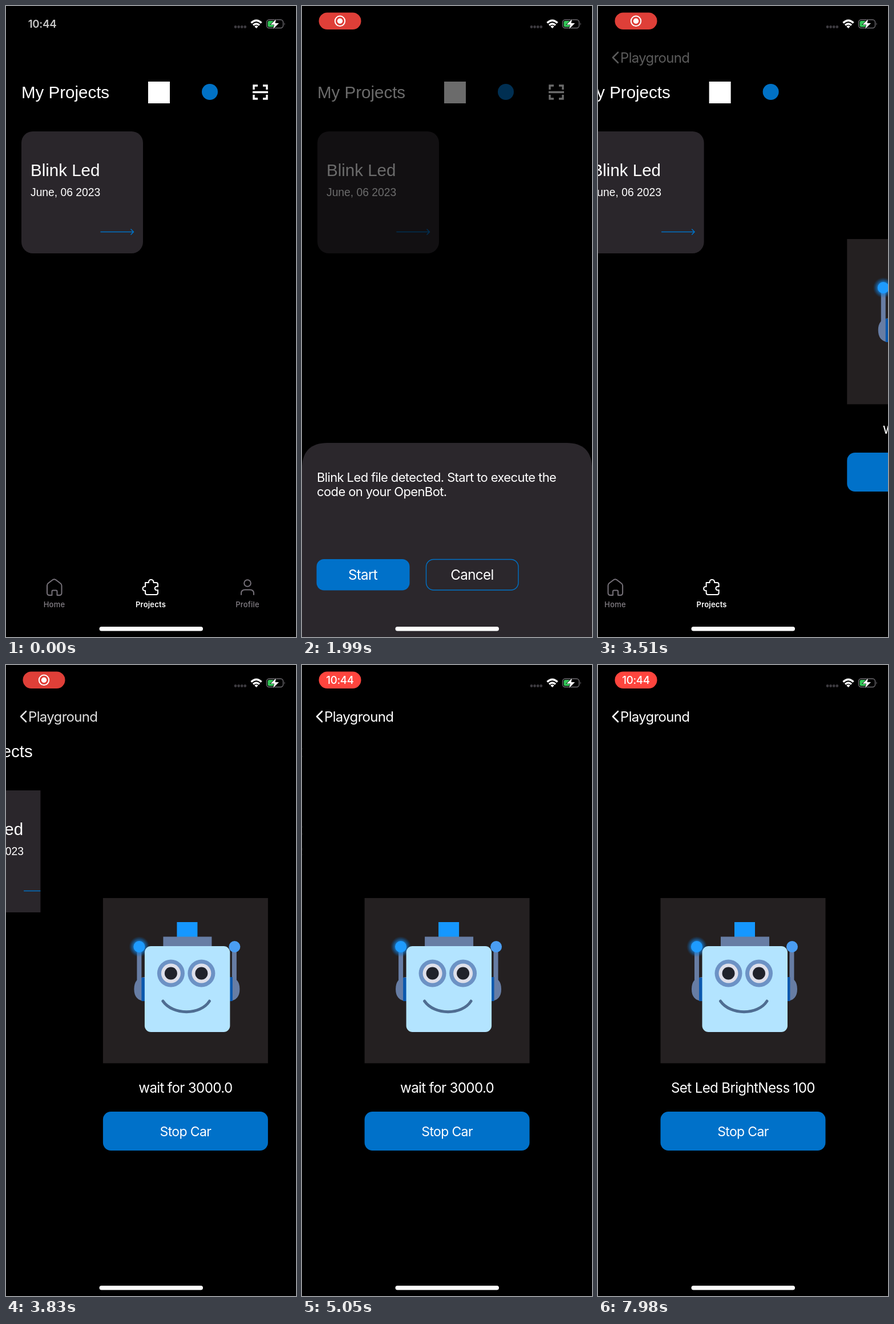
An HTML page that plays this animation: 508x1102 px, repeating every 8 s.

```html
<!DOCTYPE html>
<html lang="en">
<head>
<meta charset="utf-8">
<title>Blink Led</title>
<style>
  html, body { margin: 0; width: 100%; height: 100%; overflow: hidden; background: #000; }
  svg { display: block; width: 100vw; height: 100vh; }
  text { font-family: Inter, "Noto Sans", sans-serif; fill: #fff; letter-spacing: -.028em; }
  .title { font: 29.5px "Liberation Sans", Arial, sans-serif; letter-spacing: 0; }
  .date { font: 19.3px "Liberation Sans", Arial, sans-serif; letter-spacing: 0; }
  .nav { font-size: 24px; }
  .button { font-size: 24.2px; text-anchor: middle; }
  .body { font-size: 22px; }
  .tab { font-size: 13px; font-weight: 500; letter-spacing: .2px; text-anchor: middle; fill: #858087; }
  .tab.on { font-weight: 600; fill: #fff; }
  .clock { font-size: 18.7px; font-weight: 600; letter-spacing: -.3px; text-anchor: middle; }
  .line { fill: none; stroke: #fff; stroke-width: 2; stroke-linecap: round; stroke-linejoin: round; }
  .muted { stroke: #77727a; }
  .blue { stroke: #0071c5; }
</style>
</head>
<body>
<svg viewBox="0 0 508 1102">
  <defs>
    <radialGradient id="glow">
      <stop offset=".5" stop-color="#1688e8" stop-opacity=".8"/>
      <stop offset="1" stop-color="#0b64b4" stop-opacity="0"/>
    </radialGradient>
    <g id="eye">
      <circle r="24" fill="#6c92c5"/>
      <circle r="17" fill="#dedfea"/>
      <circle r="11" fill="#20222b"/>
    </g>
  </defs>
  <rect width="508" height="1102"/>

  <g id="projects">
    <text class="title" x="27" y="161">My Projects</text>
    <rect x="249" y="132" width="38" height="38" fill="#fff"/>
    <circle cx="357" cy="150" r="14" fill="#0071c5"/>
    <path class="line" style="stroke-width:3.4;stroke-linecap:butt;stroke-linejoin:miter"
      d="M434 146V139H441M450 139H457V146M457 155V162H450M441 162H434V155M432 150.5H459"/>
    <rect x="27" y="219" width="213" height="213" rx="20" fill="#2a262b"/>
    <text class="title" x="43" y="297">Blink Led</text>
    <text class="date" x="43" y="332">June, 06 2023</text>
    <path class="line blue" style="stroke-width:1.6" d="M166 394.500H223M219 390L223.500 394.500L219 399"/>
    <path class="line muted" d="M72 1012Q72 1009.500 74 1008L82 1002Q84.500 1000.500 87 1002L95 1008Q97.500 1009.500 97.500 1012V1025Q97.500 1029 93.500 1029H89.500V1022.500Q89.500 1020.500 87.500 1020.500H82.500Q80.500 1020.500 80.500 1022.500V1029H76Q72 1029 72 1025Z"/>
    <path class="line" d="M244 1007H250C249 1000 259 1000 258.500 1007H263Q266 1007 266 1010V1014C259 1012 259 1022 266 1020V1025Q266 1028 263 1028H247Q244 1028 244 1025V1021C238 1022 238 1013 244 1014Z"/>
    <circle class="line muted" cx="423" cy="1008" r="5.800"/>
    <path class="line muted" d="M412 1028V1026Q412 1019.500 418.500 1019.500H427.500Q434 1019.500 434 1026V1028"/>
    <text class="tab" x="84.500" y="1050">Home</text>
    <text class="tab on" x="253.500" y="1050">Projects</text>
    <text class="tab" x="423" y="1050">Profile</text>
  </g>

  <rect id="dim" width="508" height="1102"/>
  <g id="sheet">
    <path d="M0 1102V808Q0 763 45 763H463Q508 763 508 808V1102Z" fill="#2b272c"/>
    <text class="body" x="26" y="831">Blink Led file detected. Start to execute the</text>
    <text class="body" x="26" y="856">code on your OpenBot.</text>
    <rect x="25.500" y="966" width="163" height="54.500" rx="13" fill="#0071c9"/>
    <rect class="line blue" style="stroke-width:1.4" x="217.500" y="966.500" width="161.500" height="53.500" rx="13"/>
    <text class="button" x="106.500" y="1002">Start</text>
    <text class="button" x="298" y="1002">Cancel</text>
  </g>

  <g id="runner">
    <rect width="508" height="1102"/>
    <rect x="109.500" y="407" width="289" height="288.500" fill="#242021"/>
    <rect x="239" y="449" width="36" height="27" fill="#1597ff"/>
    <rect x="215" y="474.500" width="85" height="20" fill="#677da4"/>
    <path d="M173 498V552M339.500 498V552" stroke="#677da4" stroke-width="8"/>
    <path d="M183 545Q164 546 164 566T183 587ZM330 545Q349 546 349 566T330 587Z" fill="#677da4"/>
    <path d="M177 546H184V587H177ZM329 545H336.500V587H329Z" fill="#0b58ad"/>
    <circle cx="173" cy="492" r="18" fill="url(#glow)"/>
    <circle cx="173" cy="492" r="10" fill="#1e9bff"/>
    <circle cx="340" cy="492" r="10" fill="#4a9df2"/>
    <rect x="182.500" y="491" width="149.500" height="150" rx="11" fill="#b3e4ff"/>
    <use href="#eye" x="228.500" y="538.500"/>
    <use href="#eye" x="282" y="538.500"/>
    <path class="line" style="stroke:#4f6d92;stroke-width:5" d="M214.500 587C232 612 280 612 296 587"/>
    <text class="button" id="command" x="254" y="746.500"></text>
    <rect x="109.500" y="780" width="289" height="68" rx="14" fill="#0071c9"/>
    <text class="button" style="font-size:23px" x="254" y="822.500">Stop Car</text>
  </g>

  <g id="back">
    <path class="line" style="stroke-width:2.600" d="M35 81L26 90L35 99"/>
    <text class="nav" x="39" y="98.500">Playground</text>
  </g>

  <text class="clock" id="clock" x="63.500" y="38">10:44</text>
  <g id="pill">
    <rect id="pillFill" x="-37" y="-14.800" width="74" height="29.600" rx="14.800"/>
    <g id="record">
      <circle class="line" r="8.700"/>
      <circle r="4.700" fill="#fff"/>
    </g>
    <text class="clock" id="pillClock" style="font-weight:500" y="7">10:44</text>
  </g>

  <path d="M402 36.500H419" stroke="#3d3b40" stroke-width="4.800" stroke-linecap="round" stroke-dasharray="0 5.600"/>
  <g fill="none" stroke="#fff" stroke-width="3.400">
    <path d="M429.500 29.500Q438.500 21 447.500 29.500M433 33.500Q438.500 28.500 444 33.500"/>
    <path d="M438.500 39L435.300 35.700Q438.500 33 441.700 35.700Z" fill="#fff" stroke="none"/>
  </g>
  <rect class="line" style="stroke:#6d6b70;stroke-width:1.400" x="456.500" y="24" width="29" height="14.500" rx="4.500"/>
  <path d="M487.500 29Q489.500 31 487.500 34Z" fill="#77747a"/>
  <rect x="458.500" y="26" width="11" height="10.500" rx="2.500" fill="#34c759"/>
  <path d="M473 23L463.500 32.500H470L468 40L478 30H471.500Z" fill="#fff" stroke="#000" stroke-width="1.200" paint-order="stroke"/>
  <rect x="163.500" y="1084" width="181.500" height="7.400" rx="3.700" fill="#fff"/>
</svg>

<script>
const LOOP = 8000;
const SHEET_IN = 1720, SHEET_OUT = 3375, PUSH = 3395, NEXT_COMMAND = 7700;
const $ = id => document.getElementById(id);
const ramp = (t, from, to) => Math.min(1, Math.max(0, (t - from) / (to - from)));
const easeOut = x => 1 - (1 - x) ** 3;
const move = (id, x, y) => $(id).setAttribute('transform', `translate(${x} ${y})`);
const fade = (id, alpha) => $(id).setAttribute('opacity', alpha);

// Overdamped spring, going from 0 to 1
function spring(ms, slow = 5.3, fast = 32) {
  const s = Math.max(0, ms) / 1000;
  return 1 - (fast * Math.exp(-slow * s) - slow * Math.exp(-fast * s)) / (fast - slow);
}

function drawPill(t) {
  const shown = ramp(t, 250, 600);
  const bounce = Math.sin(Math.PI * ramp(t, 650, 1050));
  const settle = ramp(t, 4350, 4850);
  const sx = .9 + .1 * shown + .05 * bounce, sy = .9 + .1 * shown + .25 * bounce;
  $('pill').setAttribute('transform', `translate(66.5 26.3) scale(${sx} ${sy})`);
  $('pillFill').setAttribute('fill',
    `rgb(${223 + 32 * settle} ${63 + 6 * settle} ${56 + 6 * settle})`);
  fade('pill', shown);
  fade('clock', .78 * (1 - ramp(t, 0, 350)));
  fade('record', 1 - settle);
  fade('pillClock', settle);
}

function draw(t) {
  const sheet = t < SHEET_OUT ? easeOut(ramp(t, SHEET_IN, SHEET_IN + 240)) : 0;
  fade('dim', .58 * sheet);
  move('sheet', 0, 340 * (1 - sheet));

  const push = spring(t - PUSH);
  move('projects', -152.4 * push, 0);
  move('runner', 508 * (1 - push), 0);
  fade('back', push);
  $('command').textContent = t < NEXT_COMMAND ? 'wait for 3000.0' : 'Set Led BrightNess 100';

  drawPill(t);
}

const start = performance.now();
function tick() {
  draw((performance.now() - start) % LOOP);
  requestAnimationFrame(tick);
}
tick();
</script>
</body>
</html>
```
